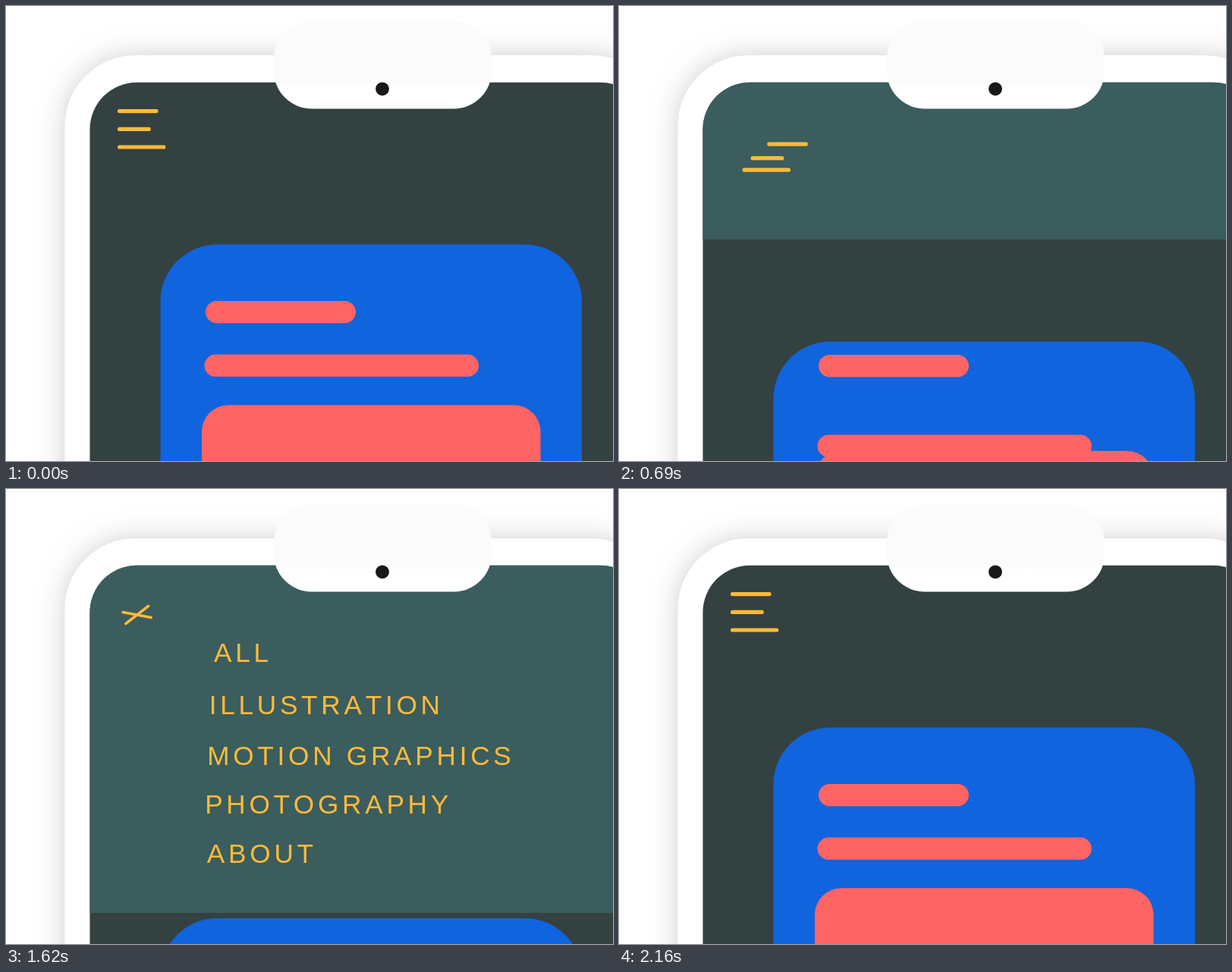
Write an HTML page with a canvas that moves like this. It is 800x600 px and loops after 2520 ms.

```html
<!DOCTYPE html>
<html lang="en">
<head>
<meta charset="utf-8">
<title>Phone menu</title>
<style>
html, body { margin: 0; width: 100%; height: 100%; overflow: hidden; background: #fff; }
canvas { display: block; width: 800px; height: 600px; }
</style>
</head>
<body>
<canvas id="stage" width="800" height="600"></canvas>
<script>
const ctx = document.getElementById('stage').getContext('2d');
const LOOP = 2520, STEP = 30, LAST = 23, OPEN_AT = 390, CLOSE_AT = 1500;
const DARK = '#344141', TEAL = '#3b5d5d', BLUE = '#1064de', CORAL = '#ff6464', GOLD = '#ffba3b';

const clamp = (v, a, b) => Math.min(b, Math.max(a, v));
const ease = u => { u = clamp(u, 0, 1); return u * u * (3 - 2 * u); };
const mix = (a, b, p) => a + (b - a) * p;

// Smooth curve through [step, value] keys, flat at both ends.
function curve(keys, k) {
  const n = keys.length - 1;
  if (k <= keys[0][0]) return keys[0][1];
  if (k >= keys[n][0]) return keys[n][1];
  let i = 0;
  while (k >= keys[i + 1][0]) i++;
  const slope = j => j === 0 || j === n ? 0
    : (keys[j + 1][1] - keys[j - 1][1]) / (keys[j + 1][0] - keys[j - 1][0]);
  const [t0, a] = keys[i], [t1, b] = keys[i + 1], d = t1 - t0, u = (k - t0) / d;
  return a + (b - a) * ease(u) + d * u * (1 - u) * ((1 - u) * slope(i) - u * slope(i + 1));
}

// Menu rows: text, open place, place when small, travel done early in closing.
const ROWS = [
  ['ALL', 274.8, 216, 240, 205, .025],
  ['ILLUSTRATION', 270.3, 287, 217.5, 244, .05],
  ['MOTION GRAPHICS', 270.3, 358, 187.7, 256, .062],
  ['PHOTOGRAPHY', 270.3, 429, 169.5, 263, .081],
  ['ABOUT', 274.8, 500, 163, 282, .089]
];

// Menu icon strokes: y, width, travel x and y, travel done half way through opening.
const STROKES = [
  [136, 53.7, 71, 64, .68],
  [159.8, 43.8, 48.5, 69.5, .55],
  [183.4, 63.4, 27, 52, .58]
];

function opening(k) {
  return {
    panel: 22 + 540 * ease((k - 1.645) / 18),
    card: 264 * ease((k - 1) / 20.4),
    bar1: curve([[0, 0], [1, -7], [3, -13], [11, 71], [18, 240], [22, 264]], k),
    bar2: curve([[1, 0], [11, 106], [17, 220], [22, 264]], k),
    tile: curve([[0, 0], [1, -4.7], [3, -9], [11, 60.5], [15, 150], [22, 264]], k),
    stroke: p => curve([[1, 0], [11, p], [17, 1.2]], k),
    strokeAlpha: 1 - ease((k - 11) / 4),
    row: () => curve([[12, 1.1], [14, .85], [18, .2], [22, 0]], k),
    scale: curve([[11, 0], [13, .14], [18, .86], [22, 1]], k),
    textAlpha: ease((k - 11) / 4),
    cross: ease((k - 11) / 4),
    angles: [45 * ease((k - 16) / 6), -45 * ease((k - 14) / 7)]
  };
}

function closing(k) {
  return {
    panel: 562 - 540 * ease((k - 4.23) / 17.8),
    card: curve([[1, 264], [5, 251.5], [11, 165.5], [17, 3], [19, -5], [23, 0]], k),
    bar1: curve([[1, 264], [11, 130], [17, -5], [19, -9], [23, 0]], k),
    bar2: curve([[1, 264], [11, 139.7], [17, -2], [19, -6], [23, 0]], k),
    tile: curve([[1, 264], [11, 160], [17, -2], [19, -7], [23, 0]], k),
    stroke: () => curve([[7, 1.3], [11, 1], [18, .12], [23, 0]], k),
    strokeAlpha: ease((k - 8) / 6),
    row: p => curve([[1, 0], [5, p], [11, 1], [14, 1.25]], k),
    scale: curve([[1, 1], [5, .979], [11, .138], [13, 0]], k),
    textAlpha: 1 - ease((k - 8) / 6),
    cross: 1 - ease((k - 11) / 3),
    angles: [curve([[1, 45], [5, 10.7], [7, 0]], k), curve([[3, -45], [5, -38], [10, 0]], k)]
  };
}

function box(x, y, w, h, r, fill) {
  ctx.fillStyle = fill;
  ctx.beginPath();
  ctx.roundRect(x, y, w, h, r);
  ctx.fill();
}

function drawBody() {
  ctx.save();
  ctx.shadowColor = 'rgba(0,0,0,.19)';
  ctx.shadowBlur = 34;
  box(77.5, 65, 786, 900, 93, '#fff');
  ctx.restore();
}

function drawNotch() {
  const shade = ctx.createLinearGradient(0, 99, 0, 109);
  shade.addColorStop(0, '#fbfbfb');
  shade.addColorStop(1, '#fff');
  box(353, 20, 287, 115.5, 50, shade);
  ctx.fillStyle = '#181818';
  ctx.beginPath();
  ctx.arc(496, 109.3, 8.9, 0, Math.PI * 2);
  ctx.fill();
}

function drawStrokes(s) {
  ctx.globalAlpha = s.strokeAlpha;
  for (const [y, w, dx, dy, half] of STROKES) {
    const p = s.stroke(half);
    box(147 + dx * p, y + dy * p, w, 5.2, 2.6, GOLD);
  }
  ctx.globalAlpha = 1;
}

function drawCross(s) {
  if (s.cross <= 0) return;
  const len = 18.9 * s.cross;
  ctx.strokeStyle = GOLD;
  ctx.lineWidth = 3.6 * Math.min(1, s.cross * 2);
  ctx.lineCap = 'round';
  for (const deg of s.angles) {
    const a = deg * Math.PI / 180, x = len * Math.cos(a), y = len * Math.sin(a);
    ctx.beginPath();
    ctx.moveTo(172.7 - x, 166 - y);
    ctx.lineTo(172.7 + x, 166 + y);
    ctx.stroke();
  }
}

function drawRows(s) {
  if (s.scale <= 0 || s.textAlpha <= 0) return;
  ctx.font = '36px "Liberation Sans", Arial, sans-serif';
  ctx.letterSpacing = '4.8px';
  ctx.fontKerning = 'none';
  for (const [text, x, y, sx, sy, early] of ROWS) {
    const p = s.row(early);
    ctx.save();
    ctx.globalAlpha = s.textAlpha;
    ctx.fillStyle = GOLD;
    ctx.translate(mix(x, sx, p), mix(y, sy, p));
    ctx.scale(s.scale, s.scale);
    ctx.fillText(text, 0, 12.5);
    ctx.restore();
  }
}

function draw(t) {
  const isOpening = t < CLOSE_AT;
  const start = isOpening ? OPEN_AT : CLOSE_AT;
  const k = clamp(Math.floor((t - start) / STEP + 1e-6) + 1, 0, LAST);
  const s = isOpening ? opening(k) : closing(k);

  ctx.fillStyle = '#fff';
  ctx.fillRect(0, 0, 800, 600);
  drawBody();

  ctx.save();
  ctx.beginPath();
  ctx.roundRect(110.5, 100.7, 734.5, 800, 62);
  ctx.clip();
  ctx.fillStyle = DARK;
  ctx.fillRect(100, 90, 700, 510);
  if (s.panel > 100) {
    ctx.fillStyle = TEAL;
    ctx.fillRect(100, 90, 700, s.panel - 90);
  }
  box(203.5, 314.5 + s.card, 555.5, 700, 75, BLUE);
  box(263, 389 + s.bar1, 198, 29.2, 14.6, CORAL);
  box(261.5, 459.6 + s.bar2, 361.5, 29.2, 14.6, CORAL);
  box(258, 526.3 + s.tile, 446.5, 400, 35, CORAL);
  drawStrokes(s);
  drawRows(s);
  drawCross(s);
  ctx.restore();

  drawNotch();
}

const begin = performance.now();
function tick() {
  draw((performance.now() - begin) % LOOP);
  requestAnimationFrame(tick);
}
tick();
</script>
</body>
</html>
```
